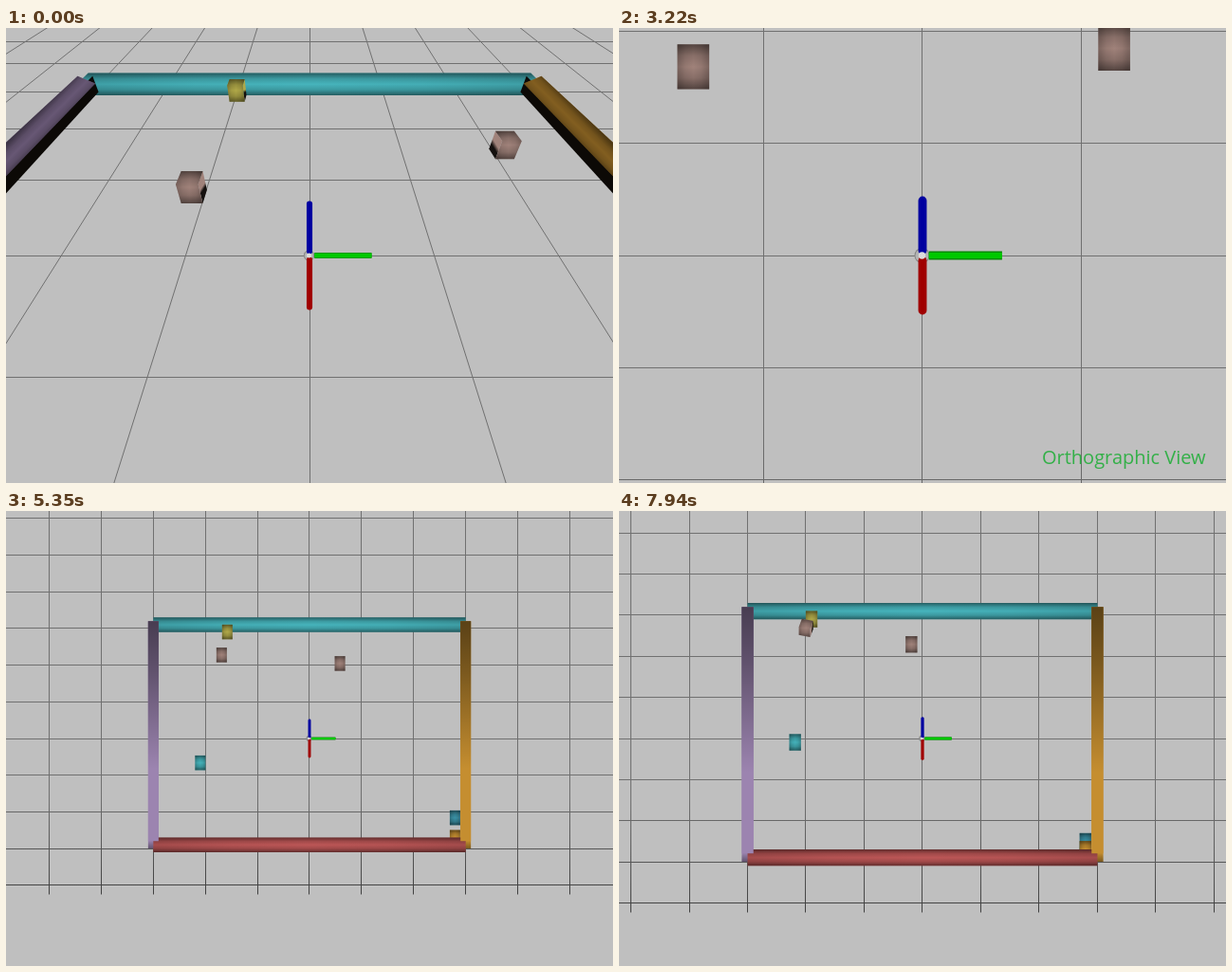
Write an HTML page with a canvas that moves like this. It is 640 by 480 pixels and loops after 8000 ms.

```html
<!DOCTYPE html>
<html lang="en">
<head>
<meta charset="utf-8">
<title>Orthographic View</title>
<style>
html, body { margin: 0; width: 100%; height: 100%; overflow: hidden; background: #bfbfbf; }
canvas { display: block; }
</style>
</head>
<body>
<canvas id="stage" width="640" height="480"></canvas>
<script>
const ctx = document.getElementById('stage').getContext('2d');
const LOOP = 8000, ORTHO_START = 1250, PHYSICS_STEP = 144.6, HEIGHT = 0.2;

// Scroll gestures on the orthographic camera: start, end, zoom factor.
const gestures = [
  [2270, 2550, 0.592], [2550, 3920, 0.733], [3920, 4070, 0.956], [4460, 4680, 0.427],
  [4740, 5220, 0.952], [5320, 5900, 0.772], [6330, 6620, 1.226], [7360, 7490, 1.167]
];
// The physics runs slightly unevenly against the clock: time in ms, simulated seconds.
const physicsPace = [[0, 0], [3920, 3.82], [4680, 4.69], [5900, 5.75], [6780, 6.83], [8000, 8.04]];

let ortho, zoom;

const progress = (t, from, to) => Math.min(1, Math.max(0, (t - from) / (to - from)));

function zoomAt(t) {
  return gestures.reduce((z, [from, to, factor]) => z * factor ** progress(t, from, to), 330);
}

function physicsTime(t) {
  const held = Math.max(0, (Math.floor(t / PHYSICS_STEP + 0.2) - 0.2) * PHYSICS_STEP);
  const next = physicsPace.findIndex(p => p[0] > held);
  const [t0, a] = physicsPace[next - 1], [t1, b] = physicsPace[next];
  return a + (b - a) * progress(held, t0, t1);
}

// World axes: x right, y towards the viewer, z up.
function project(x, y, z = 0) {
  if (ortho) return [320 + zoom * x, 240 + 0.705 * zoom * (y - z)];
  const w = 1 - 0.236 * (y + z);
  return [320 + 131 * x / w, 240 + 98.2 * (y - z) / w];
}

function fillShape(points, style) {
  ctx.beginPath();
  points.forEach(p => ctx.lineTo(...p));
  ctx.closePath();
  ctx.fillStyle = style;
  ctx.fill();
}

function ramp([x0, y0], [x1, y1], stops) {
  const g = ctx.createLinearGradient(x0, y0, x1, y1);
  stops.forEach(([at, color]) => g.addColorStop(at, color));
  return g;
}

const black = alpha => `rgba(0,0,0,${alpha})`;
const dimEdges = alpha =>
  [[0, black(alpha)], [0.25, black(alpha * 0.3)], [0.5, black(0)], [0.75, black(alpha * 0.3)], [1, black(alpha)]];

function drawBox(x, y, halfX, halfY, color, sideShade = 0.24, angle = 0) {
  const c = Math.cos(angle), s = Math.sin(angle);
  const corners = [[-1, -1], [1, -1], [1, 1], [-1, 1]].map(([i, j]) =>
    [x + i * halfX * c - j * halfY * s, y + i * halfX * s + j * halfY * c]);
  const top = corners.map(p => project(...p, HEIGHT));
  const foot = corners.map(p => project(...p));
  for (const [front, back, sign] of [[2, 1, 1], [3, 0, -1]]) {
    const turn = (top[back][0] - top[front][0]) * (foot[front][1] - top[front][1]) -
                 (top[back][1] - top[front][1]) * (foot[front][0] - top[front][0]);
    if (turn * sign < 0.01) continue;
    const shade = ramp(top[front], foot[back], [[0, color], [0.45, color], [0.7, '#14100e']]);
    fillShape([top[front], top[back], foot[back], foot[front]], shade);
  }
  const shell = [top[0], top[1], top[2], foot[2], foot[3], top[3]];
  const xs = shell.map(p => p[0]), ys = shell.map(p => p[1]);
  fillShape(shell, color);
  fillShape(shell, ramp([0, Math.min(...ys)], [0, Math.max(...ys)], dimEdges(0.48)));
  fillShape(shell, ramp([Math.min(...xs), 0], [Math.max(...xs), 0], dimEdges(sideShade)));
}

function drawSideWall(side, color, end) {
  const inner = 2.9 * side, outer = 3.1 * side;
  const far = project(outer, -3, HEIGHT);
  if (ortho) {
    const shape = [far, project(inner, -3, HEIGHT), project(inner, end), project(outer, end)];
    fillShape(shape, color);
    fillShape(shape, ramp(far, [far[0], project(0, 3)[1]],
      [[0, black(0.54)], [0.22, black(0.38)], [0.65, black(0)], [0.965, black(0)], [1, black(0.38)]]));
    return;
  }
  const strip = (x0, z0, x1, z1) =>
    [project(x0, -3, z0), project(x1, -3, z1), project(x1, 3, z1), project(x0, 3, z0)];
  fillShape(strip(inner, HEIGHT, inner, 0), '#0c0906');
  const lit = strip(outer, HEIGHT, inner, 0.11);
  const [x, y] = project(outer, -1.9, HEIGHT);
  fillShape(lit, color);
  fillShape(lit, black(0.34));
  fillShape(lit, ramp([x, y], [x - side * 18, y + 18], dimEdges(0.4)));
}

function drawSideWalls(end) {
  drawSideWall(-1, '#9c84b0', end);
  drawSideWall(1, '#c58e30', end);
}

function line(a, b, color, width) {
  ctx.beginPath();
  ctx.moveTo(...a);
  ctx.lineTo(...b);
  ctx.strokeStyle = color;
  ctx.lineWidth = width;
  ctx.stroke();
}

function drawGrid() {
  const near = ortho ? 4.24 : 3;
  const color = ortho
    ? ramp(project(0, 1.5), project(0, near), [[0, '#707070'], [1, '#404040']])
    : '#707070';
  const snap = ([x, y]) => [ortho ? Math.floor(x - 0.1) + 0.5 : x + 0.5, Math.floor(y) + 0.5];
  for (let i = -14; i <= 14; i++) {
    line(snap(project(i, -14)), snap(project(i, near)), color, 1);
    if (i <= near) line(snap(project(-30, i)), snap(project(30, i)), color, 1);
  }
}

function disc(radius, color) {
  ctx.beginPath();
  ctx.arc(319.5, 240, radius, 0, 7);
  ctx.fillStyle = color;
  ctx.fill();
}

function drawAxes() {
  const unit = ortho ? zoom : 115;
  const width = Math.max(1.5, 0.053 * unit);
  disc(0.045 * unit + 0.5, '#858585');
  disc(0.045 * unit - 0.5, '#b4b4b4');
  line(project(0.04, 0), project(0.5, 0), '#008a00', width);
  line(project(0.04, 0), project(0.5, 0), '#00c800', width * 0.7);
  ctx.lineCap = 'round';
  line(project(0, 0, 0.045), project(0, 0, 0.49), '#0000a0', width);
  line(project(0, 0.045), project(0, 0.49), '#a00000', width);
  ctx.lineCap = 'butt';
  disc(0.022 * unit, '#dcdcdc');
}

// Every cube drifts at constant speed; one stops and turns when it hits its neighbour.
function drawCubes(s) {
  const cube = (x, y, color, angle) => drawBox(x, y + 0.1, 0.1, 0.1, color, 0.24, angle);
  cube(-0.955 - 0.119 * s, -2.905, '#b0a848');
  cube(2.08 - 0.285 * s, -1.57 - 0.0905 * s, '#a0827a');
  cube(-1.09 - 0.114 * s, Math.max(-2.69, -0.845 - 0.273 * s), '#a0827a', Math.max(0, s - 6.9) * 0.25);
  cube(-1.93 - 0.032 * s, 1.765 - 0.21 * s, '#44b2ba');
  if (ortho) {
    cube(2.795, 1.5 + 0.126 * s, '#3a90a4');
    cube(2.795, 2.695, '#c58e30');
  }
}

function drawLabel(t) {
  ctx.globalAlpha = progress(t, 1200, 1470) * (1 - progress(t, 2940, 5110));
  ctx.fillStyle = '#1eae36';
  ctx.font = '20px "Open Sans", sans-serif';
  ctx.fillText('Orthographic View', 446, 460);
  ctx.globalAlpha = 1;
}

function draw(t) {
  ortho = t >= ORTHO_START;
  zoom = zoomAt(t);
  ctx.fillStyle = '#bfbfbf';
  ctx.fillRect(0, 0, 640, 480);
  drawGrid();
  drawBox(0, -3, 3, 0.1, '#46b4bc', 0.12);
  drawSideWalls(3);
  drawAxes();
  drawCubes(physicsTime(t));
  if (ortho) {
    drawBox(0, 3, 3, 0.1, '#bc5656', 0.12);
    drawSideWalls(2.8);
    drawLabel(t);
  }
}

const start = performance.now();
function tick() {
  draw((performance.now() - start) % LOOP);
  requestAnimationFrame(tick);
}
tick();
</script>
</body>
</html>
```
